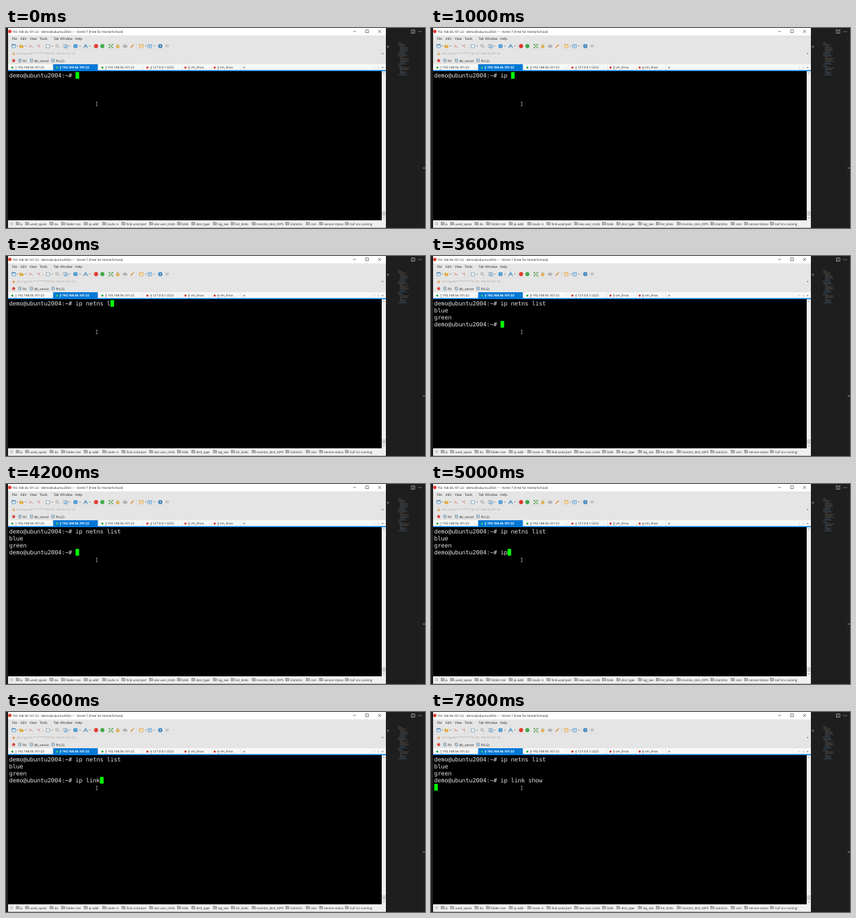
An HTML page for the animation above (8 s loop, 600x287 px).

```html
<!DOCTYPE html>
<html lang="en">
<head>
<meta charset="utf-8">
<title>Terminal session</title>
<style>
  html, body { margin: 0; width: 100%; height: 100%; overflow: hidden; background: #1e1e1e; }
  svg { display: block; width: 100vw; height: 100vh; }
  text { font: 4.6px "Open Sans", "Noto Sans", sans-serif; fill: #222; white-space: pre; text-rendering: geometricPrecision; }
  .term text { font: 8.3px "DejaVu Sans Mono", monospace; fill: #e6e6e6; }
</style>
</head>
<body>
<svg id="stage" viewBox="0 0 600 287" preserveAspectRatio="none"></svg>
<script>
const stage = document.getElementById('stage');

function add(tag, attrs, parent = stage) {
  const node = document.createElementNS('http://www.w3.org/2000/svg', tag);
  for (const key in attrs) node.setAttribute(key, attrs[key]);
  return parent.appendChild(node);
}
const rect = (x, y, width, height, fill, more) => add('rect', { x, y, width, height, fill, ...more });
const dot = (cx, cy, r, fill) => add('circle', { cx, cy, r, fill });
const line = (d, stroke, width = 0.6) => add('path', { d, stroke, 'stroke-width': width, fill: 'none' });
const shape = (d, fill) => add('path', { d, fill });
function label(x, y, string, style = '') {
  const node = add('text', { x, y, style });
  node.textContent = string;
  return node;
}
const box = (x, y, w, h, stroke, fill = 'none') => rect(x, y, w, h, fill, { stroke, 'stroke-width': 0.6 });
const caret = x => shape(`M${x - 1.1} 25.5h2.2l-1.1 1.3z`, '#555');

function drawEditor() {
  rect(544, 0, 56, 287, '#1e1e1e');
  box(580.5, 2.8, 5, 4.6, '#c5c5c5');
  line('M583 2.8v4.6', '#c5c5c5');
  for (const x of [591, 593, 595]) dot(x, 5, 0.55, '#c5c5c5');
  line('M545.6 25.5l2.6 2.6m0-2.6l-2.6 2.6', '#ccc');
  line('M597 11V287', '#2c2c2c', 0.5);
  rect(597, 200.5, 3, 1, '#a0a0a0');
  let seed = 7;
  const random = () => (seed = seed * 16807 % 2147483647) / 2147483647;
  const tints = ['#56789a', '#4f7390', '#7c766c', '#777'];
  for (let i = 0; i < 25; i++) {
    const x = 561.5 + (i % 8 > 2 ? 2.5 : 0);
    rect(x, 20 + i * 1.95, 3 + random() * 11, 0.8, tints[Math.floor(random() * 4)], { opacity: 0.6 });
  }
}

function drawWindow() {
  rect(3, 0, 541, 286.5, '#e5e5e5');
  rect(3, 0, 541, 10.5, '#fff');
  for (const y of [31.5, 42]) line(`M3 ${y}H544`, '#d8d8d8', 0.5);

  dot(5.5, 5, 2.4, '#e2392e');
  label(8.8, 6.7, '192.168.56.101:22 - demo@ubuntu2004: ~ - Vortel 7 (Free for Home/School)', 'font-size:4.5px');
  line('M497 5h4.2M532.7 2.8l4.4 4.4m0-4.4l-4.4 4.4', '#333');
  box(515, 2.8, 4, 4, '#333');

  const menu = [[8.5, 'File'], [21, 'Edit'], [34, 'View'], [48, 'Tools'], [68, 'Tab'], [77.5, 'Window'], [99, 'Help']];
  for (const [x, name] of menu) label(x, 17.4, name, 'font-size:4.7px');
}

function drawToolbar() {
  const blue = '#3f86bd', gray = '#999', gold = '#e0ad45';
  box(8.3, 24, 5, 4.2, blue, '#dcebf5');
  rect(8, 23.5, 5.6, 1.3, blue);
  shape('M19.2 24h2l.8.8h3v3.7h-5.8z', gold);
  line('M33.5 24l5 4m-5 0l2-2M44 24l5 4m0-4l-2 2', '#d58484', 1);
  box(57.5, 24, 5, 4.4, '#708ba0', '#e9f1f5');
  add('circle', { cx: 73, cy: 25.3, r: 1.8, fill: 'none', stroke: gray, 'stroke-width': 0.8 });
  line('M74.3 26.6l2 2', gray, 1);
  box(82.5, 23.5, 4, 4, gray, '#fff');
  box(84, 24.8, 4, 4, blue, '#b8d5ea');
  dot(99.5, 26, 3, '#2a86c8');
  line('M97 26h5m-2.5-3q-2 3 0 6q2-3 0-6', '#a8d2ee', 0.5);
  line('M111 28.7l3-5.4 3 5.4m-4.7-2h3.4', blue, 1);
  dot(129, 26, 2.9, '#e2392e');
  dot(138, 26, 2.9, '#43a94a');
  // four arrows pointing to the corners
  line('M147.5 25v-1.7h1.7m2 0h1.7v1.7m0 2v1.7h-1.7m-2 0h-1.7v-1.7M147.5 23.3l5.4 5.4m0-5.4l-5.4 5.4', '#55a04c', 0.9);
  rect(157.7, 25.3, 4.6, 3.4, gold);
  line('M158.7 25.3v-1q1.3-1.8 2.6 0v1', '#a48448', 0.7);
  rect(167.5, 24.5, 6, 3.6, '#b0b0b0');
  rect(169, 23.3, 3, 1.4, '#c4c4c4');
  line('M178.5 28.3l4.5-4.5', '#d7923f', 1.6);
  box(191, 23.8, 5.2, 4.5, '#d49a45', '#f1cf8f');
  line('M193.6 25.8v2.5m-2.6-1.4h5.2', '#fff', 0.5);
  box(203, 23.8, 5.2, 4.5, blue, '#e2eff8');
  line('M203 25.2h5.2m-2.6 0v3', blue);
  dot(221, 26, 3, '#3982bb');
  label(219.9, 27.8, '?', 'fill:#fff;font-weight:bold');
  rect(228, 23.8, 5.5, 3.8, '#c6c6c6', { rx: 1 });
  shape('M229.5 27h2l-2 2z', '#c6c6c6');
  [16, 28, 66, 91, 106, 120, 200, 212].forEach(caret);
  for (const x of [31, 53.5, 80, 124.5, 187, 216]) line(`M${x} 23v6`, '#c8c8c8', 0.5);

  rect(9.2, 36, 3.6, 2.7, '#e5ae70');
  line('M10 36v-1q1-1.4 2 0v1', '#d6a878');
  label(15, 38.2, 'ssh://guest:********@192.168.56.101:22', 'font-size:4.4px;fill:#a5a5a5');
  shape('M538 36h2.6l-1.3 1.5z', '#555');

  dot(11, 46.8, 2.2, '#d84c46');
  for (const [x, name] of [[24, 'fhl'], [40.5, 'db_server'], [71.5, 'fhl (2)']]) {
    box(x - 6, 44.7, 3.8, 3.3, '#6c8799', '#b8d1df');
    line(`M${x - 5.5} 49h3`, '#6c8799');
    label(x, 48.8, name);
  }
}

function drawTabs() {
  const green = '#20a638', red = '#d02f2b', blue = '#0078d7', address = '192.168.56.101:22';
  rect(3, 52, 541, 9, '#f8f8f8');
  rect(67.5, 52, 64, 9, blue);
  rect(3, 60.5, 541, 1.5, blue);
  const tabs = [[9, address, green], [73, address, '#37d05b'], [138, address, green],
    [202.5, '127.0.0.1:2222', red], [257, 'vm_linux', red], [298.8, 'vm_linux', red]];
  tabs.forEach(([x, name, color], i) => {
    const active = i === 1;
    const style = active ? 'fill:#fff;font-weight:bold;font-size:4.5px' : 'font-size:4.5px';
    dot(x, 56.8, 1.5, color);
    label(x + 3.8, 58.4, i + 1, style);
    label(x + 7.5, 58.4, name, style);
    line(`M${x + 3.8} 59.3h2.4`, active ? '#fff' : '#555', 0.4);
  });
  for (const x of [196, 252.5, 294.5, 336.5]) line(`M${x} 53v7`, '#d2d2d2', 0.5);
  for (const x of [64, 128.5, 192, 248, 291, 333]) dot(x, 56.8, 0.45, '#aaa');
  line('M339.5 56.8h3m-1.5-1.5v3', '#444', 0.5);
  line('M528 55.4l-1.4 1.4 1.4 1.4m4.8-2.8l1.4 1.4-1.4 1.4', '#999');
  shape('M538 56.2h2.6l-1.3 1.5z', '#555');
}

function drawFrame() {
  rect(3, 62, 535, 214, '#000');
  rect(538, 62, 6, 214, '#f0f0f0');
  rect(538.3, 263, 5.4, 6.5, '#cdcdcd');
  line('M539.5 65.5l1.5-1.5 1.5 1.5', '#666');
  line('M539.5 271.6l1.5 1.5 1.5-1.5', '#666');
  rect(3, 276, 541, 10.5, '#f0f0f0');
  for (let y = 279; y < 284; y += 1.7) line(`M5.5 ${y}h5`, '#aaa', 0.7);
  const commands = [[21, 'p'], [34.5, 'used_space'], [69.5, 'du'], [86, 'folder size'], [118.5, 'ip addr'],
    [145, 'route -n'], [172.5, 'find used port'], [212, 'see user_cmds'], [252, 'lsblk'], [272.5, 'disk_type'],
    [303.5, 'log_see'], [329, 'list_disks'], [359, 'monitor_disk_IOPS'], [407, 'statistics'], [436.5, 'ram'],
    [455.5, 'service status'], [492.5, 'lsof srv running']];
  for (const [x, name] of commands) {
    box(x - 6.6, 279, 4.8, 3.7, '#858585', '#b4b4b4');
    line(`M${x - 6.6} 278.6h2.2`, '#858585', 0.8);
    label(x, 282.6, name, 'font-size:4.4px');
  }
}

drawEditor();
drawWindow();
drawToolbar();
drawTabs();
drawFrame();

const LOOP = 8000, KEY_DELAY = 200, LEFT = 4.6, TOP = 63, CELL = 5, ROW = 10;
const PROMPT = 'demo@ubuntu2004:~# ';
const bursts = [[600, 'ip '], [1600, 'netns list\n'], [4800, 'ip '], [6000, 'link show\n']];
const listing = `blue\ngreen\n${PROMPT}`;

const term = add('g', { class: 'term' });
const cursor = add('rect', { width: 5.1, height: 9.6, fill: '#00ff00' }, term);
const rows = [0, 1, 2, 3, 4].map(i => add('text', { x: LEFT, y: TOP + 7.7 + i * ROW }, term));
line('M128.6 106.3h2.6m-1.3 0v5.4m-1.3 0h2.6', '#b0b0b0', 0.7);

function screenAt(time) {
  const typed = bursts.map(([start, keys]) =>
    keys.slice(0, Math.max(0, Math.floor((time - start) / KEY_DELAY) + 1))).join('');
  return (PROMPT + typed).replace('\n', '\n' + listing).split('\n');
}

function render(now) {
  const lines = screenAt(now % LOOP);
  rows.forEach((row, i) => { row.textContent = lines[i] || ''; });
  const last = lines.length - 1;
  cursor.setAttribute('x', LEFT + lines[last].length * CELL);
  cursor.setAttribute('y', TOP + 0.2 + last * ROW);
  requestAnimationFrame(render);
}
render(performance.now());
</script>
</body>
</html>
```
